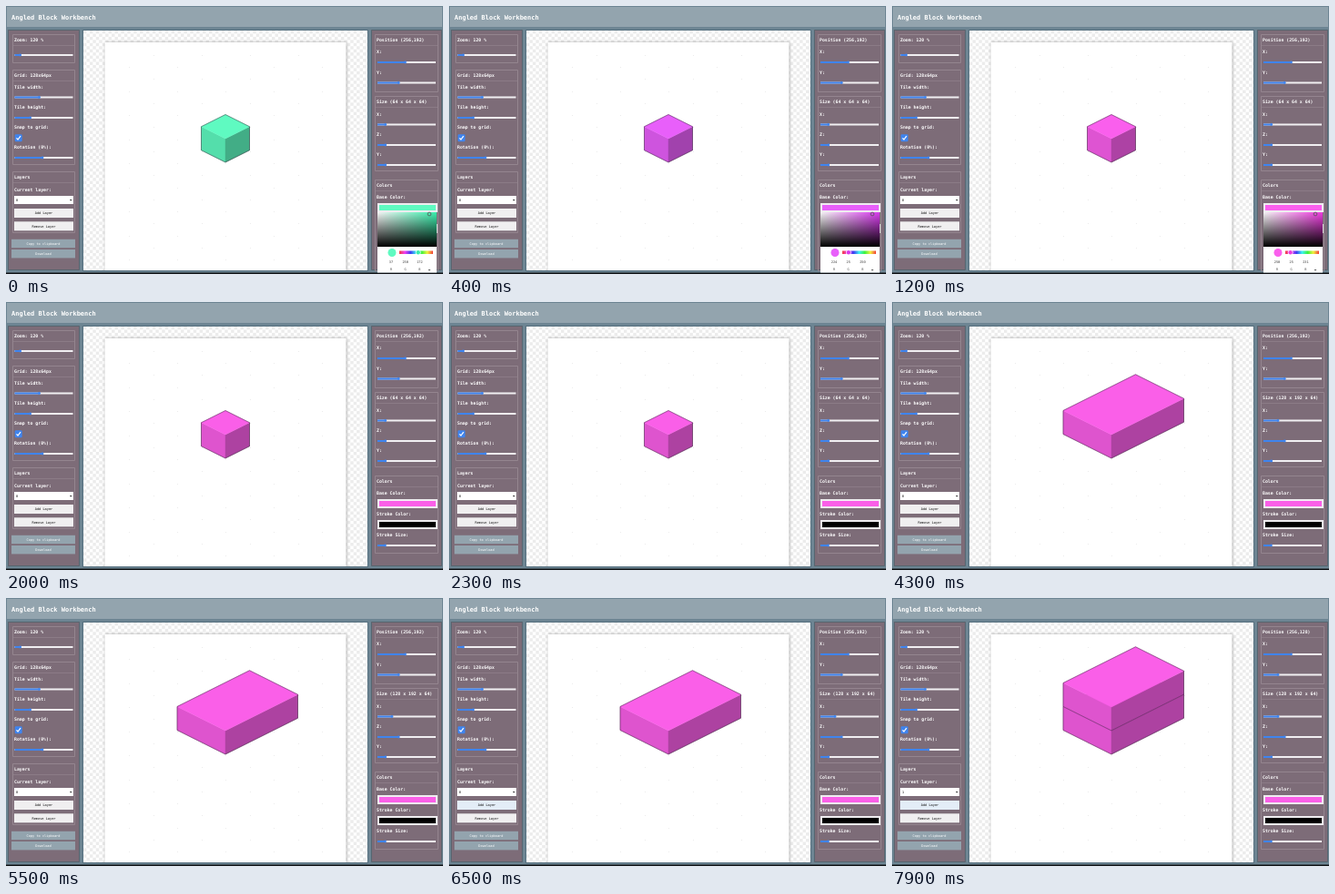
An HTML page with a canvas that plays this animation: 480 by 295 pixels, repeating every 8000 ms.

```html
<!DOCTYPE html>
<html lang="en">
<head>
<meta charset="utf-8">
<title>Angled Block Workbench</title>
<style>
  html, body { margin: 0; width: 100%; height: 100%; overflow: hidden; background: #6d8593; }
  canvas { display: block; width: 480px; height: 295px; }
</style>
</head>
<body>
<canvas id="stage" width="480" height="295"></canvas>
<script>
const ctx = document.getElementById('stage').getContext('2d');
const LOOP = 8000;
const MONO = '"DejaVu Sans Mono", "Noto Sans Mono", monospace';
const BLUE = '#3f84ee';
const UNIT = 26.5 / 64;
const CELL = 3.45;

// Each track lists [time, value]; a value holds until the next one.
const tracks = {
  hue: [[0, 158], [100, 176], [200, 212], [300, 258], [400, 293], [500, 300],
        [600, 309], [700, 302], [1000, 303], [1200, 305], [1400, 307]],
  saturation: [[0, 0.852], [400, 0.9]],
  picker: [[0, true], [1600, false]],
  z: [[0, 64], [2600, 96], [2700, 128], [2800, 160], [2900, 192]],
  x: [[0, 64], [3700, 96], [4100, 128]],
  focus: [[0, false], [6500, true]],
  layer: [[0, 0], [6700, 1]]
};

function valueAt(track, t) {
  let value = track[0][1];
  for (const [time, next] of track) if (t >= time) value = next;
  return value;
}

function hsv(h, s, v) {
  const channel = n => {
    const k = (n + h / 60) % 6;
    return Math.round(255 * v * (1 - s * Math.max(0, Math.min(k, 4 - k, 1))));
  };
  return [channel(5), channel(3), channel(1)];
}
const css = rgb => `rgb(${rgb.join(',')})`;

function rect(x, y, w, h, fill) {
  ctx.fillStyle = fill;
  ctx.fillRect(x, y, w, h);
}

function frame(x, y, w, h, color) {
  ctx.strokeStyle = color;
  ctx.lineWidth = 1;
  ctx.strokeRect(x + 0.5, y + 0.5, w - 1, h - 1);
}

function disc(x, y, r, fill) {
  ctx.fillStyle = fill;
  ctx.beginPath();
  ctx.arc(x, y, r, 0, Math.PI * 2);
  ctx.fill();
}

function write(str, x, y, font, color, align = 'left') {
  ctx.font = `${font} ${MONO}`;
  ctx.fillStyle = color;
  ctx.textAlign = align;
  ctx.textBaseline = 'middle';
  ctx.fillText(str, x, y);
}
const label = (str, x, y) => write(str, x, y, 'bold 4.85px', '#fff');
const small = (str, x, y, color, align) => write(str, x, y, '3.6px', color, align);

function polygon(points, fill, stroke, width = 0.4) {
  ctx.beginPath();
  points.forEach(([x, y]) => ctx.lineTo(x, y));
  ctx.closePath();
  if (fill) {
    ctx.fillStyle = fill;
    ctx.fill();
  }
  if (!stroke) return;
  ctx.strokeStyle = stroke;
  ctx.lineWidth = width;
  ctx.lineJoin = 'round';
  ctx.stroke();
}

function slider(x, y, share) {
  const thumb = x + 1.5 + share * 58;
  rect(x, y - 1, 64, 2, '#f1eff2');
  rect(x, y - 1, thumb - x, 2, BLUE);
  disc(thumb, y, 1.4, BLUE);
}

function button(str, x, y, w, h, fill, color) {
  rect(x, y, w, h, fill);
  small(str, x + w / 2, y + h / 2 + 0.3, color, 'center');
}

function group(title, x, y, w, h) {
  frame(x, y, w, h, '#94858f');
  rect(x, y + 12, w, 0.6, '#94858f');
  label(title, x + 2, y + 6.3);
}

function panel(x, w) {
  rect(x, 26, w, 265, '#7d6c78');
  frame(x, 26, w, 265, '#56656f');
}

function drawShell() {
  rect(0, 0, 480, 295, '#6d8593');
  rect(1, 1, 478, 22, '#93a4ae');
  write('Angled Block Workbench', 6, 13, 'bold 7px', '#fff');
  panel(2, 79);
  panel(401, 78);
  rect(0, 293.5, 480, 1.5, '#101215');
}

function drawBoard() {
  rect(84, 26, 314, 266, '#56707f');
  rect(85, 27, 312, 264, '#fff');
  ctx.save();
  ctx.beginPath();
  ctx.rect(85, 27, 312, 264);
  ctx.clip();
  for (let row = 0; row * CELL < 264; row++)
    for (let col = row % 2; col * CELL < 312; col += 2)
      rect(85 + col * CELL, 27 + row * CELL, CELL, CELL, '#ececec');
  ctx.shadowColor = 'rgba(0,0,0,0.35)';
  ctx.shadowBlur = 3;
  ctx.shadowOffsetX = 0.5;
  rect(108.5, 40, 265, 260, '#fff');
  ctx.shadowColor = 'transparent';
  for (let row = -5; row < 13; row++)
    for (let col = -4; col < 5; col++)
      if ((row + col) % 2 === 0)
        rect(Math.round(241 + col * 26.5), Math.round(120 + row * 13.25), 1, 1, '#ececec');
  ctx.restore();
}

function drawBox(x, y, z, lift, hue) {
  const sx = x * UNIT, sz = z * UNIT, h = y * 26 / 64;
  const top = 172 - lift * 26 / 64 - h;
  const front = [241, top];
  const left = [241 - sx, top - sx / 2];
  const right = [241 + sz, top - sz / 2];
  const back = [241 - sx + sz, top - (sx + sz) / 2];
  const down = ([px, py]) => [px, py + h];
  const face = (points, v) => {
    const color = css(hsv(hue, 0.62, v));
    polygon(points, color, color);
  };
  face([front, left, down(left), down(front)], 0.87);
  face([front, right, down(right), down(front)], 0.68);
  face([front, left, back, right], 0.98);
  polygon([left, back, right, down(right), down(front), down(left)],
    null, 'rgba(30,20,35,0.75)', 0.6);
}

function drawLeft(state) {
  group('Zoom: 120 %', 7, 31, 69, 32);
  slider(9.5, 54, 0.08);

  group('Grid: 128x64px', 7, 70, 69, 105);
  label('Tile width:', 9, 90);
  slider(9.5, 100.5, 0.44);
  label('Tile height:', 9, 112);
  slider(9.5, 123, 0.27);
  label('Snap to grid:', 9, 134);
  ctx.fillStyle = BLUE;
  ctx.beginPath();
  ctx.roundRect(9.7, 141.2, 8, 8, 1.2);
  ctx.fill();
  ctx.strokeStyle = '#fff';
  ctx.lineWidth = 1.2;
  ctx.beginPath();
  ctx.moveTo(11.5, 145.3);
  ctx.lineTo(13.1, 147);
  ctx.lineTo(16, 143.2);
  ctx.stroke();
  label('Rotation (0%):', 9, 156);
  slider(9.5, 167, 0.5);

  group('Layers', 7, 182, 69, 68);
  label('Current layer:', 9, 202.5);
  rect(9, 209, 65, 9, '#fff');
  small(String(state.layer), 11, 213.8, '#111');
  polygon([[70, 213], [72.4, 213], [71.2, 214.6]], '#111');
  button('Add Layer', 9, 223, 65, 10, state.focus ? '#e3edf7' : '#f0eff0', '#111');
  button('Remove Layer', 9, 237.3, 65, 10, '#f0eff0', '#111');
  button('Copy to clipboard', 6, 256.8, 70, 9.4, '#93a4ae', '#fff');
  button('Download', 6, 268, 70, 9.4, '#93a4ae', '#fff');
}

function colorInput(y, color) {
  rect(408, y, 66, 10, '#efedf0');
  rect(410, y + 2, 62, 6, color);
}

function drawRight(state) {
  group(`Position (256,${state.y})`, 405, 31, 70, 64);
  label('X:', 407, 51);
  slider(408, 62, 0.5);
  label('Y:', 407, 73.5);
  slider(408, 84.5, state.y / 512);

  group(`Size (${state.x} x ${state.z} x 64)`, 405, 99, 70, 83);
  label('X:', 407, 120);
  slider(408, 130.5, state.x / 512);
  label('Z:', 407, 142);
  slider(408, 153, state.z / 512);
  label('Y:', 407, 164);
  slider(408, 175, 64 / 512);

  group('Colors', 405, 191, 70, state.picker ? 101 : 86);
  label('Base Color:', 407, 210.5);
  colorInput(217, css(hsv(state.hue, 0.62, 0.98)));
  if (state.picker) return drawPicker(state);
  label('Stroke Color:', 407, 234);
  colorInput(240, '#000');
  label('Stroke Size:', 407, 257);
  slider(408, 268, 0.12);
}

function gradient(x0, y0, x1, y1, stops) {
  const g = ctx.createLinearGradient(x0, y0, x1, y1);
  stops.forEach((color, i) => g.addColorStop(i / (stops.length - 1), color));
  return g;
}

function drawPicker({ hue, saturation }) {
  const color = hsv(hue, saturation, 0.98);
  const soft = css(hsv(hue, 0.75, 0.93));
  rect(408, 227, 65, 66.5, '#fff');
  rect(408, 227, 65, 38, gradient(408, 0, 473, 0, ['#f4f4f4', soft]));
  rect(408, 227, 65, 38, gradient(0, 227, 0, 265, ['rgba(0,0,0,0)', '#000']));
  rect(473, 240, 1, 10, '#dcdcdc');
  ctx.strokeStyle = '#555';
  ctx.lineWidth = 0.8;
  ctx.beginPath();
  ctx.arc(465, 229, 1.9, 0, Math.PI * 2);
  ctx.stroke();

  disc(424, 271.5, 4.5, css(hsv(hue, 0.62, 0.98)));
  const hues = [360, 300, 240, 180, 120, 60, 0].map(h => css(hsv(h, 0.75, 0.95)));
  rect(432, 269.5, 37, 3.5, gradient(432, 0, 469, 0, hues));
  const mark = 432 + (360 - hue) / 360 * 37;
  disc(mark, 271.3, 2.8, '#fff');
  disc(mark, 271.3, 2.2, soft);

  color.forEach((value, i) => {
    const x = 423 + i * 15.7;
    small(String(value), x, 282, '#333', 'center');
    small('RGB'[i], x, 290.5, '#555', 'center');
  });
  polygon([[463.5, 290], [466.5, 290], [465, 291.5]], '#555');
}

function draw(t) {
  const state = {};
  for (const key in tracks) state[key] = valueAt(tracks[key], t);
  state.y = 192 - state.layer * 64;
  drawShell();
  drawBoard();
  for (let i = 0; i <= state.layer; i++)
    drawBox(state.x, 64, state.z, i * 64, state.hue);
  drawLeft(state);
  drawRight(state);
}

const start = performance.now();
function tick() {
  draw((performance.now() - start) % LOOP);
  requestAnimationFrame(tick);
}
tick();
</script>
</body>
</html>
```
